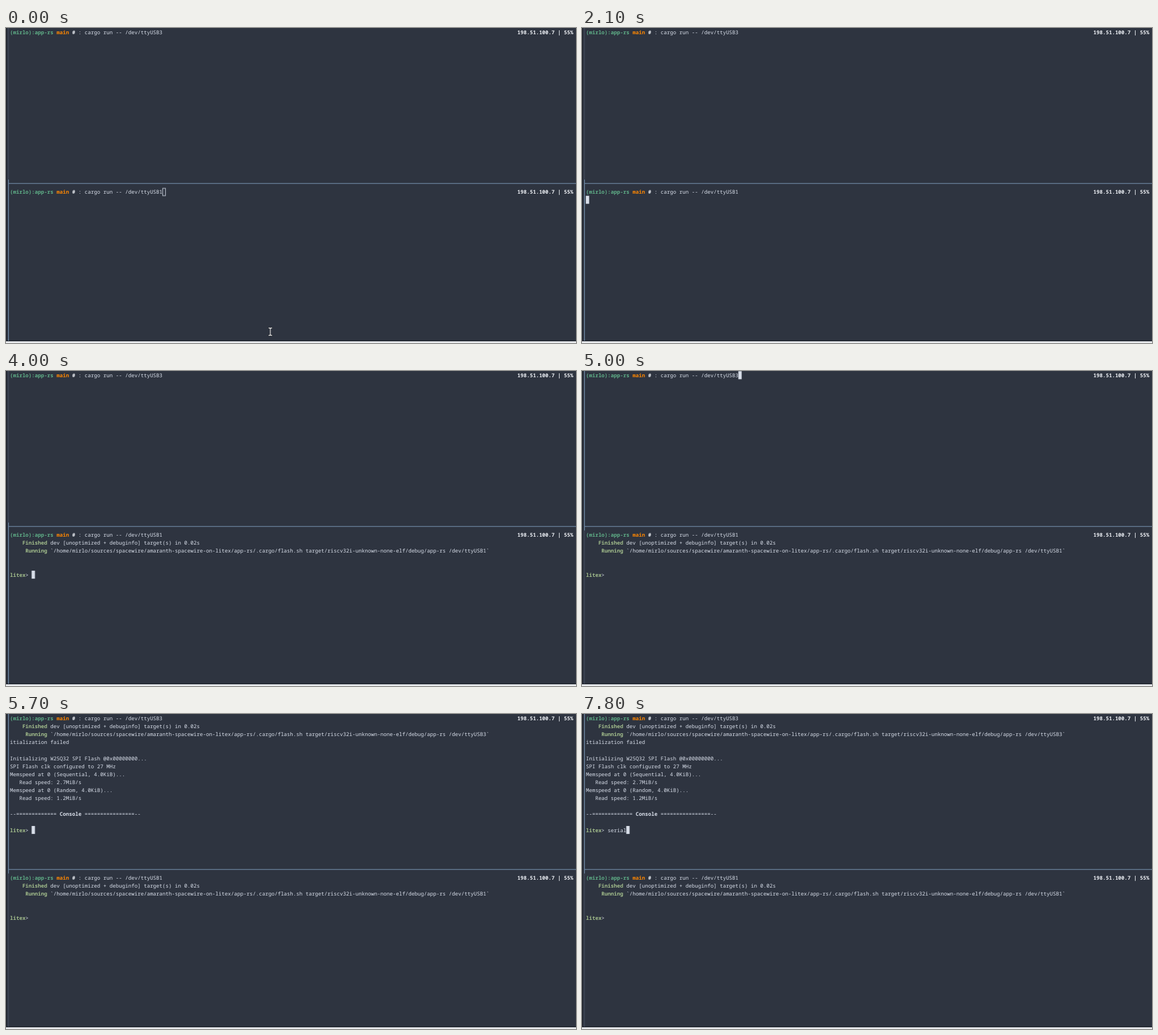
Animation, 1006 px wide and 557 px high, one loop 8000 ms. Source, as an HTML page:

```html
<!DOCTYPE html>
<html lang="en">
<head>
<meta charset="utf-8">
<title>Terminal session</title>
<style>
html, body { margin: 0; width: 100%; height: 100%; overflow: hidden; background: #2e3440; }
svg { display: block; width: 1006px; height: 557px; }
text {
  font: 9.157px "Noto Sans Mono", monospace;
  fill: #d8dee9;
  white-space: pre;
  text-rendering: geometricPrecision;
}
.b { font-weight: 700; }
.user { font-weight: 700; fill: #5faf87; }
.branch { font-weight: 700; fill: #ff8700; }
.white { font-weight: 700; fill: #eceff4; }
.ok { font-weight: 700; fill: #a3be8c; }

.t2200, .t4000, .t5600, .t5700, .t7200, .t7400, .t7500, .t7700, .t7800,
#cursor, #block, #hollow, #pointer, #lowerEdge, #upperEdge {
  animation: 8s step-end infinite;
}
.t2200 { animation-name: t2200; }
.t4000 { animation-name: t4000; }
.t5600 { animation-name: t5600; }
.t5700 { animation-name: t5700; }
.t7200 { animation-name: t7200; }
.t7400 { animation-name: t7400; }
.t7500 { animation-name: t7500; }
.t7700 { animation-name: t7700; }
.t7800 { animation-name: t7800; }
@keyframes t2200 { 0% { visibility: hidden } 27.5%, to { visibility: visible } }
@keyframes t4000 { 0% { visibility: hidden } 50%, to { visibility: visible } }
@keyframes t5600 { 0% { visibility: hidden } 70%, to { visibility: visible } }
@keyframes t5700 { 0% { visibility: hidden } 71.25%, to { visibility: visible } }
@keyframes t7200 { 0% { visibility: hidden } 90%, to { visibility: visible } }
@keyframes t7400 { 0% { visibility: hidden } 92.5%, to { visibility: visible } }
@keyframes t7500 { 0% { visibility: hidden } 93.75%, to { visibility: visible } }
@keyframes t7700 { 0% { visibility: hidden } 96.25%, to { visibility: visible } }
@keyframes t7800 { 0% { visibility: hidden } 97.5%, to { visibility: visible } }

/* focus arrives, then moves to the upper pane */
#block { animation-name: focus; }
#hollow { animation-name: unfocus; }
@keyframes focus { 0% { visibility: hidden } 2.5%, to { visibility: visible } }
@keyframes unfocus { 0% { visibility: visible } 2.5%, to { visibility: hidden } }
#lowerEdge { animation-name: lower; }
#upperEdge { animation-name: upper; }
@keyframes lower { 0% { visibility: visible } 62.5%, to { visibility: hidden } }
@keyframes upper { 0% { visibility: hidden } 62.5%, to { visibility: visible } }

#cursor { animation-name: cursor; }
@keyframes cursor {
  0% { transform: translate(276.1px, 282.6px) }
  26.25% { transform: translate(6.9px, 296.7px) }
  27.5% { transform: translate(6.9px, 324.9px) }
  50% { transform: translate(45.4px, 353.1px) }
  62.5% { transform: translate(276.1px, .4px) }
  70% { transform: translate(6.9px, 42.7px) }
  71.25% { transform: translate(45.4px, 198px) }
  90% { transform: translate(50.9px, 198px) }
  92.5% { transform: translate(56.4px, 198px) }
  93.75% { transform: translate(67.3px, 198px) }
  96.25% { transform: translate(72.8px, 198px) }
  97.5%, to { transform: translate(78.3px, 198px) }
}

#pointer { animation-name: pointer; }
@keyframes pointer {
  0% { transform: translate(466.5px, 537px) }
  2.5% { transform: translate(469px, 529px) }
  3.75% { transform: translate(474px, 512px) }
  5% { transform: translate(478px, 497px) }
  6.25% { transform: translate(480px, 490.5px); visibility: visible }
  10%, to { transform: translate(480px, 490.5px); visibility: hidden }
}
</style>
</head>
<body>
<svg viewBox="0 0 1006 557">
  <defs>
    <path id="beam" d="M-2.5-6.5H-1L0-5.5L1-6.5H2.5M0-5.5V5.5M-2.5 6.5H-1L0 5.5L1 6.5H2.5"/>
  </defs>
  <rect width="1006" height="557" fill="#2e3440"/>
  <rect width="2" height="553" fill="#20242c"/>
  <rect x="2" width="1" height="553" fill="#3b4252"/>
  <rect y="552" width="1006" height="2" fill="#252a34"/>
  <rect y="554" width="1006" height="3" fill="#e6e8eb"/>
  <rect x="4" width="1" height="553" fill="#434c5e"/>
  <rect x="4" y="274.4" width="1002" height="1" fill="#81a1c1"/>
  <rect id="upperEdge" x="4" width="1" height="282" fill="#81a1c1"/>
  <rect id="lowerEdge" x="4" y="268" width="1" height="285" fill="#81a1c1"/>
  <g id="screen"></g>
  <g id="cursor">
    <rect id="block" x="-.2" width="5.9" height="14.1" fill="#d8dee9"/>
    <rect id="hollow" x=".4" y=".9" width="5" height="13" fill="none" stroke="#d8dee9"/>
  </g>
  <g id="pointer" fill="none" stroke-linecap="square">
    <use href="#beam" stroke="#15181e" stroke-width="2.8"/>
    <use href="#beam" stroke="#fff" stroke-width="1.3"/>
  </g>
</svg>
<script>
const LEFT = 6.9, COL = 5.494, ROW = 14.1, BASE = 11.1;
const screen = document.getElementById('screen');

const span = (cls, s) => `<tspan class="${cls}">${s}</tspan>`;

// Lays one line of text on the terminal's cell grid
function line(row, html, cls = '', col = 0) {
  const text = document.createElementNS('http://www.w3.org/2000/svg', 'text');
  text.innerHTML = html;
  const cells = Array.from(text.textContent, (_, i) => (LEFT + (col + i) * COL).toFixed(2));
  text.setAttribute('x', cells.join(' '));
  text.setAttribute('y', BASE + row * ROW);
  text.setAttribute('class', cls);
  screen.append(text);
}

// Prompt line plus the two build lines of one pane
function session(row, port, cls) {
  const path = '/home/mirlo/sources/spacewire/amaranth-spacewire-on-litex/app-rs/.cargo/flash.sh';
  const target = 'target/riscv32i-unknown-none-elf/debug/app-rs';
  line(row, `${span('user', '(mirlo):app-rs')} ${span('branch', 'main')} ${span('white', '#')} : cargo run -- ${port}`);
  line(row, '198.51.100.7 | 55%', 'white', 163);
  line(row + 1, `${span('ok', 'Finished')} dev [unoptimized + debuginfo] target(s) in 0.02s`, cls, 4);
  line(row + 2, `${span('ok', 'Running')} \`${path} ${target} ${port}\``, cls, 5);
}

const prompt = span('ok', 'litex') + '&gt;';
const boot = [
  [3, 'itialization failed'],
  [5, 'Initializing W25Q32 SPI Flash @0x00000000...'],
  [6, 'SPI Flash clk configured to 27 MHz'],
  [7, 'Memspeed at 0 (Sequential, 4.0KiB)...'],
  [8, 'Read speed: 2.7MiB/s', 3],
  [9, 'Memspeed at 0 (Random, 4.0KiB)...'],
  [10, 'Read speed: 1.2MiB/s', 3],
  [12, `--${'='.repeat(13)} ${span('b', 'Console')} ${'='.repeat(16)}--`],
  [14, prompt]
];
const typed = [['s', 't7200'], ['e', 't7400'], ['ri', 't7500'], ['a', 't7700'], ['l', 't7800']];

session(0, '/dev/ttyUSB3', 't5600');
session(20, '/dev/ttyUSB1', 't2200');
line(25, prompt, 't4000');
for (const [row, s, col] of boot) line(row, s, 't5700', col);
let col = 7;
for (const [s, cls] of typed) {
  line(14, s, cls, col);
  col += s.length;
}
</script>
</body>
</html>
```
